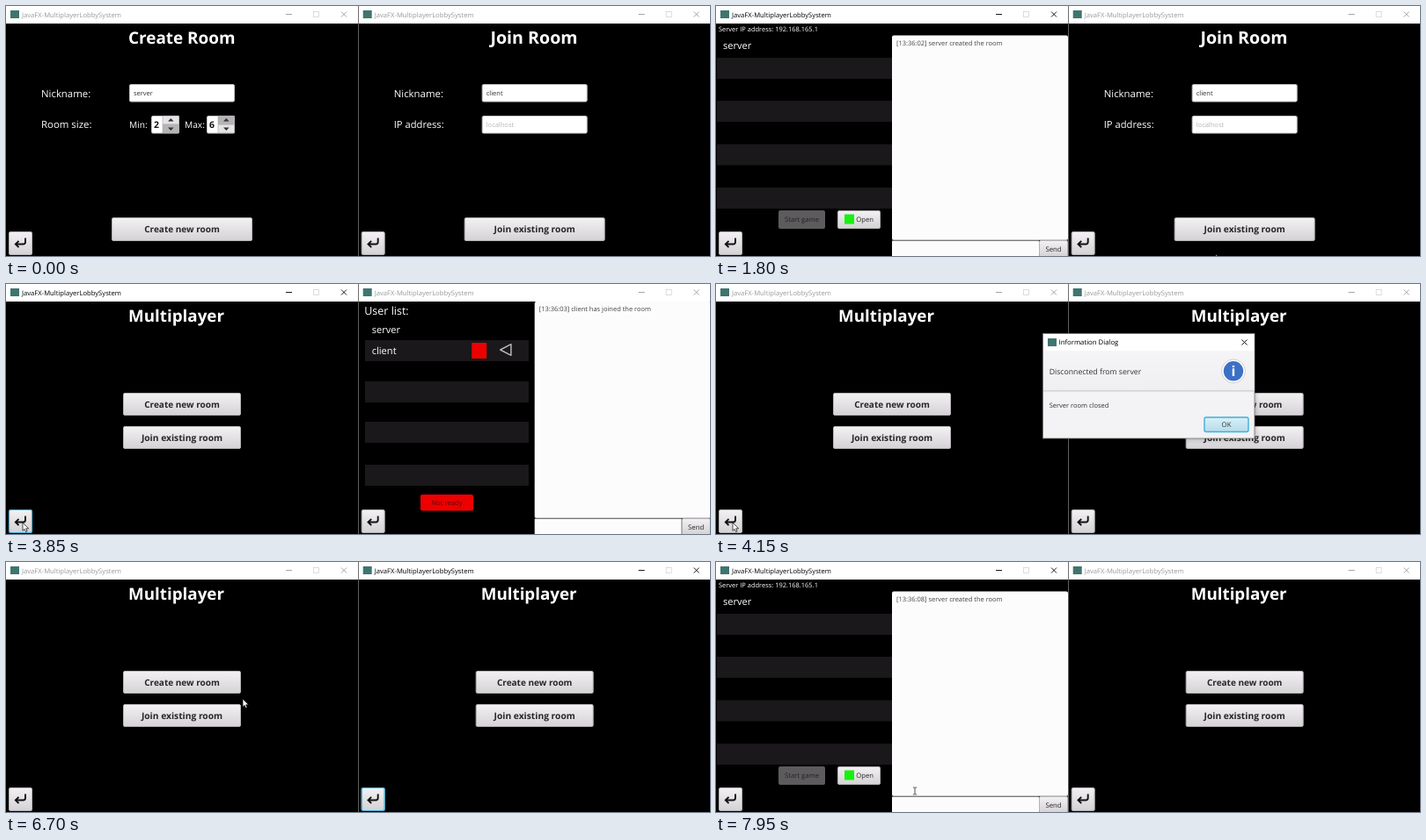
These frames come from a looping animation (800 by 285 pixels, 8000 ms). An HTML page:

```html
<!DOCTYPE html>
<html lang="en">
<head>
<meta charset="utf-8">
<title>Lobby</title>
<style>
html, body { margin: 0; width: 100%; height: 100%; overflow: hidden; background: #000; }
svg { display: block; width: 800px; height: 285px; font-family: "Open Sans", "Noto Sans", sans-serif; }
text { white-space: pre; text-rendering: geometricPrecision; }
</style>
</head>
<body>
<svg id="stage" viewBox="0 0 800 285" xmlns="http://www.w3.org/2000/svg"></svg>
<script>
const LOOP = 8000, STEP = 50, RIGHT = 400.7;

// Drawing helpers
const group = (id, body, x = 0) => `<g id="${id}" transform="translate(${x} 0)">${body}</g>`;
const rect = (x, y, w, h, fill, extra = '') =>
  `<rect x="${x}" y="${y}" width="${w}" height="${h}" fill="${fill}" ${extra}/>`;
const path = (d, extra) => `<path d="${d}" ${extra}/>`;
const text = (s, x, y, size, fill = '#fff', extra = '') =>
  `<text x="${x}" y="${y}" font-size="${size}" fill="${fill}" ${extra}>${s}</text>`;
const mid = (s, x, y, size, fill, extra = '') =>
  text(s, x, y, size, fill, 'text-anchor="middle" ' + extra);
const BOLD = 'font-weight="700"';

const box = (x, y, w, h, fill = 'url(#face)', stroke = '#b4b2b4') =>
  rect(x + .5, y + .5, w - 1, h - 1, fill, `rx="1.5" stroke="${stroke}"`);
const button = (s, x, y, w, h, size, extra = '') =>
  box(x, y, w, h) + mid(s, x + w / 2, y + h / 2 + size * .36, size, '#282628', extra);
const heading = (s, size = 18.9) => text(s, 139, 43.4, size, '#fff', BOLD);
const field = (s, y, fill) => box(140, y, 120, 20.5, '#fff', '#c4c2c4') + text(s, 145, y + 13, 7.5, fill);
const back = id =>
  box(3, 257, 27, 27) +
  path('M22 264.5V269Q22 271.5 19.5 271.5H11M14.5 267.8L10.8 271.5L14.5 275.2',
    'fill="none" stroke="#111" stroke-width="1.9"') +
  `<rect id="${id}" x="3.5" y="257.5" width="26" height="26" rx="2" fill="none" stroke="#3fb0d8" stroke-width="1.2"/>`;

function spinner(x, value, offIndex) {
  const half = i => rect(x + 13, 125.2 + i * 10, 18.5, 9.6,
    i === offIndex ? '#b5b3b5' : '#e6e4e6', 'stroke="#a9a7a9" stroke-width=".6"');
  const cx = x + 22.3;
  return box(x, 125, 32, 20.5, '#fff', '#c4c2c4') + half(0) + half(1) +
    path(`M${cx - 3.3} 131.5h6.6l-3.3 -3.4zM${cx - 3.3} 138.6h6.6l-3.3 3.4z`, 'fill="#333"') +
    text(value, x + 3, 139.2, 10.4, '#111', BOLD);
}

const bar = id =>
  rect(0, 0, 400, 20, '#fff') + rect(5, 5, 10, 9, '#3f756e') +
  `<g id="${id}" fill="#000" stroke="#000">` +
  `<text x="18" y="12.8" font-size="7.65" stroke="none">JavaFX-MultiplayerLobbySystem</text>` +
  path('M318 9.5h7M381 6.5l6 6M387 6.5l-6 6', 'stroke-width=".9" fill="none"') + '</g>' +
  rect(349.5, 6.5, 6, 6, 'none', 'stroke="#d4d4d4" stroke-width=".8"');

const menu = () => heading('Multiplayer', 18.8) +
  button('Create new room', 133, 124, 134, 26, 10, BOLD) +
  button('Join existing room', 133, 162, 134, 26, 10.25, BOLD);

const create = () => heading('Create Room') +
  text('Nickname:', 40, 103.5, 11.4) + field('server', 89, '#333') +
  text('Room size:', 40, 139, 11.4) +
  text('Min:', 140, 139, 10.2) + spinner(165, 2, 1) +
  text('Max:', 203, 139, 10.2) + spinner(228, 6, 0) +
  button('Create new room', 120, 241, 160, 27, 10, BOLD);

const join = () => text('Join Room', 149.8, 43.4, 19.6, '#fff', BOLD) +
  text('Nickname:', 40, 103.5, 11.4) + field('client', 89, '#333') +
  text('IP address:', 40, 139, 11.2) + field('localhost', 125, '#b9b7b9') +
  button('Join existing room', 120, 241, 160, 27, 10.25, BOLD);

const chat = top =>
  rect(200, top, 200, 267 - top, '#fdfcfd', 'rx="2"') +
  rect(200, 267.5, 167, 18, '#fdfcfd', 'rx="1"') +
  path('M200 267h200', 'stroke="#777" stroke-width=".8"') +
  button('Send', 367, 267, 33, 19.5, 7.8);
const rows = (tops, x, w) => tops.map(y => rect(x, y, w, 24, '#1a181a')).join('');
const line = (s, y) => text(s, 205, y, 7.48, '#454345');

const hostRoom = () => text('Server IP address: 192.168.165.1', 3, 28.8, 7.47) +
  text('server', 8, 49, 11.1) + rows([59, 108, 157.5, 207], 1, 199) +
  rect(71, 233, 53, 21, '#5d5b5d', 'rx="2"') + mid('Start game', 97.5, 246.3, 7.7, '#242224') +
  box(138, 233, 49, 21) + rect(146, 237.5, 11, 11, '#18f010') + text('Open', 159.3, 246.3, 7.7, '#282628') +
  chat(33.5) + line('[13:36:02] server created the room', 44.6).replace('<text', '<text id="log"') +
  group('guest', text('client', 8, 74.3, 11.1) + rect(121, 61, 18, 18.5, '#ee0000') +
    button('Kick', 152, 61, 47.5, 21.5, 10.2) + line('[13:36:03] client has joined the room', 55.6));

const list = (id, tops, base) => group(id,
  text('server', 15, base, 11.1) + rows(tops, 7.3, 186) + text('client', 15, tops[0] + 16.2, 11.1) +
  rect(128.5, tops[0] + 3, 17, 18, '#ee0000') +
  path(`M161 ${tops[0] + 11}l12.2 -6.3v12.6z`,
    'fill="none" stroke="#b8b6b8" stroke-width="1.5" stroke-linejoin="round"'));

const guestRoom = () => text('User list:', 6.5, 34.5, 12.5) +
  list('listA', [66, 115, 164.5, 214], 57) + list('listB', [64, 111, 157, 206], 56) +
  rect(70.3, 240, 60, 18.5, '#ee0000', 'rx="2"') + mid('Not ready', 100.3, 251.8, 7.75, '#5c0606') +
  chat(20) + line('[13:36:03] client has joined the room', 31.2);

const dialog = () =>
  rect(372, 57, 240, 119, '#000', 'opacity=".35" filter="url(#soft)"') +
  rect(371.5, 56.5, 240.5, 119.5, '#f3f2f4', 'stroke="#777" stroke-width=".8"') +
  rect(372, 57, 239.5, 19.5, '#fff') + rect(377, 62, 10, 9, '#3f756e') +
  text('Information Dialog', 389.5, 69.2, 7.75, '#000') +
  path('M597.5 63.5l6 6M603.5 63.5l-6 6', 'stroke="#000" stroke-width=".9"') +
  rect(372, 76.5, 239.5, 45, 'url(#head)') + rect(372, 121.5, 239.5, .9, '#bdbdbd') +
  text('Disconnected from server', 378.7, 103, 8.7, '#333') +
  '<circle cx="588" cy="99.3" r="13.4" fill="#fff" stroke="#c6c6c6" stroke-width=".8"/>' +
  '<circle cx="588" cy="99.3" r="11.2" fill="#3c70c6"/>' +
  mid('i', 588, 105.2, 16, '#fff', BOLD) +
  text('Server room closed', 378.7, 141.1, 7.5, '#333') +
  rect(555, 152, 50, 16.5, 'url(#lit)', 'rx="2" stroke="#3fb0d8" stroke-width="1.4"') +
  mid('OK', 580, 163, 7.8, '#333');

const gradient = (id, a, b) =>
  `<linearGradient id="${id}" x2="0" y2="1"><stop stop-color="${a}"/><stop offset="1" stop-color="${b}"/></linearGradient>`;

document.getElementById('stage').innerHTML =
  '<defs>' + gradient('face', '#f3f1f3', '#d4d2d4') + gradient('head', '#f5f4f6', '#efeef0') +
  gradient('lit', '#d9f0f8', '#b4dcea') +
  '<filter id="soft"><feGaussianBlur stdDeviation="3"/></filter></defs>' +
  rect(0, 0, 800, 285, '#000') +
  group('left', bar('barL') + group('create', create()) + group('host', hostRoom()) +
    group('menuL', menu()) + back('focusL')) +
  group('right', bar('barR') + group('join', join()) + group('client', guestRoom()) +
    group('menuR', menu()) + back('focusR'), RIGHT) +
  rect(400, 0, .8, 285, '#777') +
  group('dialog', dialog()) +
  path('M0 0V9.3L2.1 7.4L3.6 10.6L5.1 9.9L3.7 6.8H6.6Z',
    'id="arrow" fill="#fff" stroke="#000" stroke-width=".7"') +
  path('M-2 -4H-.5L0 -3.5L.5 -4H2M0 -3.5V3.5M-2 4H-.5L0 3.5L.5 4H2',
    'id="beam" fill="none" stroke="#222" stroke-width=".8"');

// Moments of the story, in ms
const T = { host: 1050, joined: 2250, settle: 2600, leave: 3750, closed: 4000, ok: 5550, again: 6950, host2: 7450 };

// Pointer stops: time, x, y
const stops = [
  [0, 235, 300], [700, 230, 296], [1000, 200, 257], [1100, 201, 258], [1550, 540, 288],
  [1800, 568, 283], [1950, 569, 282], [2200, 597, 256], [2300, 597, 256], [2500, 590, 262],
  [2750, 540, 270], [3600, 19, 272], [4500, 19, 272], [5350, 569, 153], [5600, 569, 153],
  [6150, 400, 158], [6350, 400, 158], [6700, 269, 156], [6900, 205, 139], [7050, 204, 140],
  [7350, 201, 256], [7550, 201, 256], [7950, 226, 261], [8000, 226, 261]
];

function pointer(t) {
  const i = Math.max(1, stops.findIndex(s => s[0] > t));
  const [t0, x0, y0] = stops[i - 1], [t1, x1, y1] = stops[i];
  const u = (t - t0) / (t1 - t0), e = u * u * (3 - 2 * u);
  return [x0 + (x1 - x0) * e, y0 + (y1 - y0) * e];
}

const $ = id => document.getElementById(id);
const show = (id, on) => $(id).setAttribute('visibility', on ? 'inherit' : 'hidden');
const active = (id, on) => {
  $(id).setAttribute('fill', on ? '#000' : '#999');
  $(id).setAttribute('stroke', on ? '#000' : '#999');
};

function draw(t) {
  const within = (a, b) => t >= a && t < b;
  const host = within(T.host, T.leave) || t >= T.host2;
  const client = within(T.joined, T.closed);

  show('create', t < T.host || within(T.again, T.host2));
  show('host', host);
  show('menuL', within(T.leave, T.again));
  show('guest', within(T.joined, T.leave));
  $('log').textContent = `[13:36:0${t < T.host2 ? 2 : 8}] server created the room`;
  show('join', t < T.joined);
  show('client', client);
  show('listA', client && t < T.settle);
  show('listB', client && t >= T.settle);
  show('menuR', t >= T.closed);
  show('dialog', within(T.closed, T.ok));

  active('barL', within(T.host, T.joined) || within(T.leave, T.closed) || t >= T.again);
  active('barR', within(T.joined, T.leave) || within(T.ok, T.again));
  show('focusL', within(T.leave, T.closed));
  show('focusR', within(T.ok, T.again));

  const [x, y] = pointer(t);
  const beam = host && x > 200 && x < 367 && y > 34;
  show('arrow', !beam);
  show('beam', beam);
  $(beam ? 'beam' : 'arrow').setAttribute('transform', `translate(${x} ${y})`);
}

const start = performance.now();
function tick() {
  const t = (performance.now() - start) % LOOP;
  draw(Math.floor(t / STEP) * STEP);
  requestAnimationFrame(tick);
}
tick();
</script>
</body>
</html>
```
